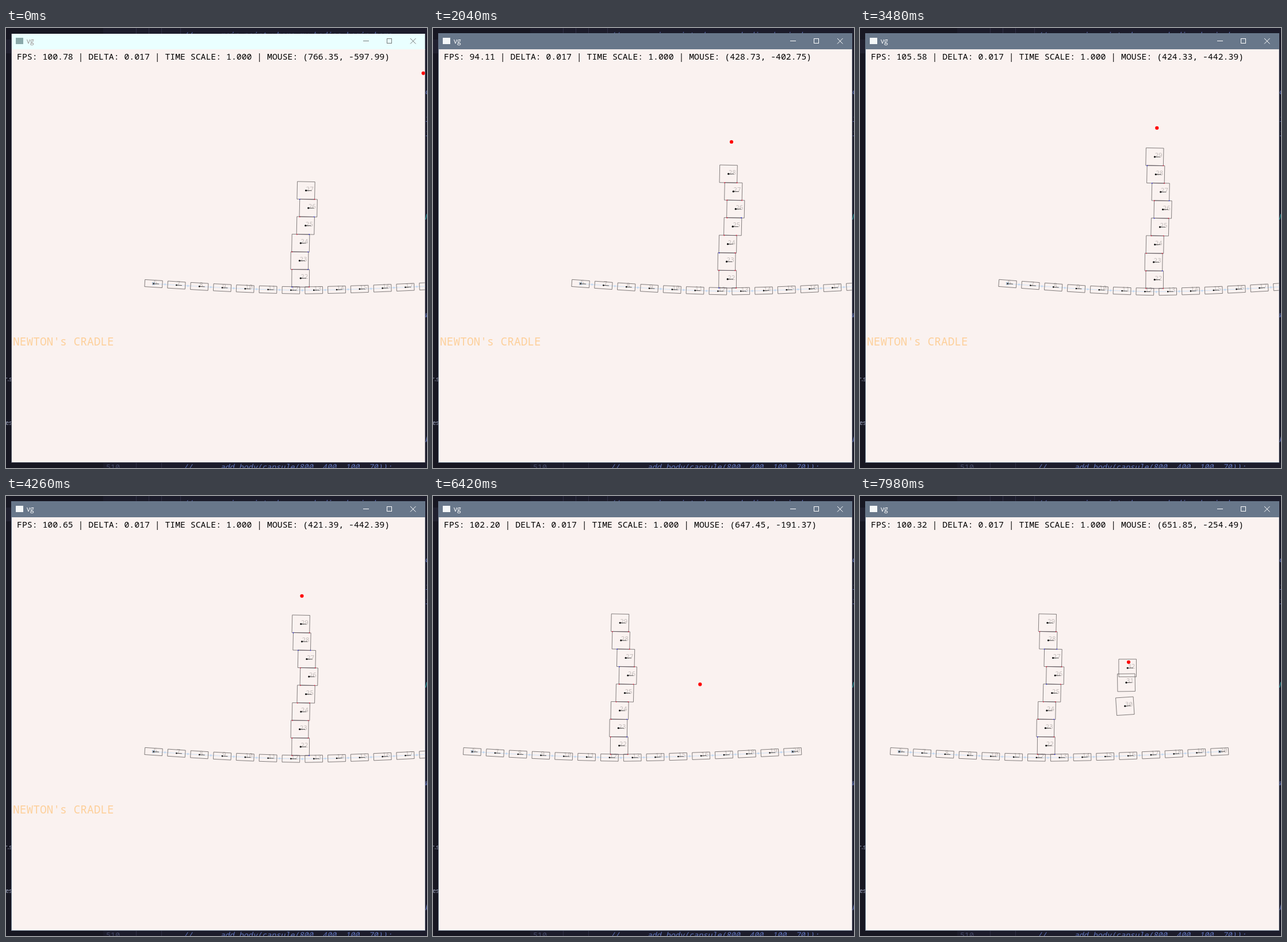
Animation of 732 by 765 pixels, one loop 8000 ms. Source, as an HTML page with a canvas:

```html
<!DOCTYPE html>
<html lang="en">
<head>
<meta charset="utf-8">
<title>vg</title>
<style>
  html, body { margin: 0; width: 100%; height: 100%; overflow: hidden; background: #191926; }
  canvas { display: block; }
</style>
</head>
<body>
<canvas id="stage" width="732" height="765"></canvas>
<script>
const ctx = document.getElementById('stage').getContext('2d');
const LOOP = 8000, STEP = 60, SCALE = 0.612, BOX = 30.6, STACK = 30.5;
const ORIGIN = { x: 256.6, y: 444.5 };
const LINK = 39.8, LINKS = 15, PAN = 188.5;
const MONO = '"Noto Sans Mono", "DejaVu Sans Mono", monospace';
const SANS = '"Open Sans", "Noto Sans", sans-serif';

// Time, pointer x and y in world units, height of the lowest tower box, frame rate
const poses = [
  [0, 766.35, -597.99, 435, 100.78],
  [900, 480, -405, 433.6, 99],
  [1740, 428.73, -402.75, 433.6, 98],
  [2040, 428.73, -402.75, 436.7, 94.11],
  [3480, 424.33, -442.39, 437.5, 105.58],
  [4260, 421.39, -442.39, 436, 100.65],
  [4680, 697.36, -200.18, 435, 98],
  [5340, 697.36, -200.18, 438.3, 81.83],
  [6420, 647.45, -191.37, 434, 102.2],
  [7400, 651.85, -254.49, 436, 100],
  [7980, 651.85, -254.49, 434, 100.32]
];
// Sideways offsets of the stacked boxes, from the bottom up
const towerOffsets = [0, -1.8, 0.1, 8.6, 13.5, 9.4, 0.7, -1.3];
const dropTimes = { 28: 1380, 29: 3000 };
const LOOSE_START = 7475, LOOSE_EVERY = 160;

const smooth = u => u * u * (3 - 2 * u);
const mix = (a, b, u) => a + (b - a) * u;
const clamp01 = u => Math.min(1, Math.max(0, u));
const noise = n => { const s = Math.sin(n * 127.1 + 11.7) * 43758.5453; return s - Math.floor(s); };
const fallen = (from, age) => from + 300 * (age / 1000) ** 2;
const panAt = t => -PAN * smooth(clamp01((t - 4680) / 600));

function poseAt(t) {
  const next = Math.max(1, poses.findIndex(p => p[0] >= t));
  const a = poses[next - 1], b = poses[next];
  const u = smooth((t - a[0]) / (b[0] - a[0]));
  const [, px, py, towerY, fps] = a.map((v, i) => mix(v, b[i], u));
  const jitter = (noise(t / STEP) - .5) * 24 * u * (1 - u);
  return {
    px, py, towerY, fps: fps + jitter,
    dotX: ORIGIN.x + panAt(t) + px * SCALE,
    dotY: ORIGIN.y + py * SCALE
  };
}

function rect(x, y, w, h, color) {
  ctx.fillStyle = color;
  ctx.fillRect(x, y, w, h);
}

function outline(x, y, w, h, color, width = 1) {
  ctx.strokeStyle = color;
  ctx.lineWidth = width;
  ctx.strokeRect(x, y, w, h);
}

function disc(x, y, r, color) {
  ctx.fillStyle = color;
  ctx.beginPath();
  ctx.arc(x, y, r, 0, Math.PI * 2);
  ctx.fill();
}

function line(x1, y1, x2, y2, color, width = 1) {
  ctx.strokeStyle = color;
  ctx.lineWidth = width;
  ctx.beginPath();
  ctx.moveTo(x1, y1);
  ctx.lineTo(x2, y2);
  ctx.stroke();
}

function text(str, x, y, font, color) {
  ctx.font = font;
  ctx.fillStyle = color;
  ctx.fillText(str, x, y);
}

function drawBody(id, x, y, angle, height, dot) {
  text(id, x, y + 1, `11px ${MONO}`, '#c3bdbb');
  ctx.save();
  ctx.translate(x, y);
  ctx.rotate(angle);
  outline(-BOX / 2, -height / 2, BOX, height, '#5c5858', .75);
  line(0, 0, 9.5, 0, '#444', .9);
  disc(0, 0, dot, '#111');
  ctx.restore();
}

const drawBox = (id, x, y, tilt) => drawBody(id, x, y, tilt * Math.PI / 180, BOX, 1.6);

function drawBackdrop() {
  const comment = '#6074ba', code = `italic 13.45px ${MONO}`, gutter = `11px ${SANS}`;
  rect(0, 0, 732, 765, '#1c1c2b');
  rect(0, 0, 169, 765, '#171722');
  rect(0, 20, 10, 24, '#20202f');
  for (const x of [226.5, 248.5, 270.5, 303.5]) line(x, 0, x, 10, '#303046');
  for (const x of [226.5, 270.5]) line(x, 755, x, 765, '#303046');
  text('//      main point where my bodies begin here', 308, 17, code, comment);
  text('510', 174, 768, `13.45px ${MONO}`, '#454a68');
  text('//      add_body(capsule(800, 400, 100, 70));', 308, 768, code, comment);
  text('r.s', -2, 614, gutter, '#a9b1cc');
  text('es', -1, 690, gutter, '#a9b1cc');
  for (const [ch, y] of [['c', 115], ['1', 163], ['1', 188], ['w', 503], ['k', 720]])
    text(ch, 728, y, code, comment);
  text('N', 728, 333, code, '#2aa5a5');
}

function drawWindow(active) {
  const ink = active ? '#fff' : '#777c7c';
  rect(9, active ? 9 : 10, 720, active ? 747 : 746, active ? '#68778a' : '#4b4d5c');
  rect(10, 10, 718.5, 28, active ? '#68778a' : '#eaffff');
  rect(10, 37, 718.5, 718, '#faf2f0');
  rect(17, 17, 13, 11, active ? '#f4f7f8' : '#8aa9aa');
  text('vg', 36, 27, `12px ${SANS}`, active ? '#fff' : '#98908f');
  line(621, 22.5, 631, 22.5, ink);
  outline(662.5, 18.5, 8, 8, ink);
  line(703, 18, 712.5, 27.5, ink);
  line(712.5, 18, 703, 27.5, ink);
}

function drawBridge(pan, towerY) {
  const depth = (towerY + 20.9 - ORIGIN.y) * 1.02;
  const x = i => ORIGIN.x + pan + i * LINK;
  const y = i => {
    const u = i < 6.5 ? i / 6.5 : (14 - i) / 7.5;
    return ORIGIN.y + depth * mix(u, Math.sin(u * Math.PI / 2), .7);
  };
  for (let i = 0; i < LINKS - 1; i++) {
    line(x(i), y(i), x(i + 1), y(i + 1), '#cfe1f5');
    disc(x(i + .5), y(i + .5), 1.8, '#c6dbf3');
  }
  for (let i = 0; i < LINKS; i++) {
    const angle = Math.atan2(y(i + .4) - y(i - .4), LINK * .8);
    drawBody(i + 6, x(i), y(i), angle, 12.2, 1.3);
    if (i % (LINKS - 1) === 0) outline(x(i) - 2, y(i) - 2, 4, 4, '#8fb0cf', .7);
  }
}

function drawContacts(left, right, y, seed) {
  line(left, y, right, y, 'rgba(70,30,80,.2)', .7);
  [left, right].forEach((x, side) =>
    disc(x, y, .9, noise(seed + side) < .7 ? '#e02040' : '#3030e0'));
}

function drawTower(t, pan, towerY) {
  let below = null;
  towerOffsets.forEach((offset, k) => {
    const id = 22 + k, born = dropTimes[id] || 0;
    if (t < born) return;
    const x = 512.2 + offset + pan + k * t / LOOP / 2;
    const rest = towerY - STACK * k;
    const y = born ? Math.min(rest, fallen(poseAt(born).dotY, t - born)) : rest;
    drawBox(id, x, y, Math.min(1.2, .5 + .3 * k));
    const side = below === null ? x : below;
    if (y === rest)
      drawContacts(Math.max(x, side) - 15, Math.min(x, side) + 15, y + BOX / 2,
        k * 3 + Math.floor(t / 240) * 31);
    below = x;
  });
}

function drawLoose(t) {
  for (let i = 0; i < 3; i++) {
    const born = LOOSE_START + i * LOOSE_EVERY, age = t - born;
    if (age >= 0)
      drawBox(30 + i, 460.8 + 2.2 * i, fallen(poseAt(born).dotY, age), -3.5 * (age / 500) ** 4);
  }
}

function draw(t) {
  const pan = panAt(t), pose = poseAt(t);
  drawBackdrop();
  drawWindow(t >= 300);
  ctx.save();
  ctx.beginPath();
  ctx.rect(10, 37, 718.5, 718);
  ctx.clip();
  text("NEWTON's CRADLE", 12 + pan, 552, `19.55px ${MONO}`, '#fdd09b');
  drawBridge(pan, pose.towerY);
  drawTower(t, pan, pose.towerY);
  drawLoose(t);
  text(`FPS: ${pose.fps.toFixed(2)} | DELTA: 0.017 | TIME SCALE: 1.000 | ` +
    `MOUSE: (${pose.px.toFixed(2)}, ${pose.py.toFixed(2)})`, 19, 55, `14.8px ${MONO}`, '#000');
  disc(pose.dotX, pose.dotY, 3.1, '#f00');
  ctx.restore();
}

const start = performance.now();
function frame() {
  const t = (performance.now() - start) % LOOP;
  draw(Math.floor(t / STEP) * STEP);
  requestAnimationFrame(frame);
}
frame();
</script>
</body>
</html>
```
